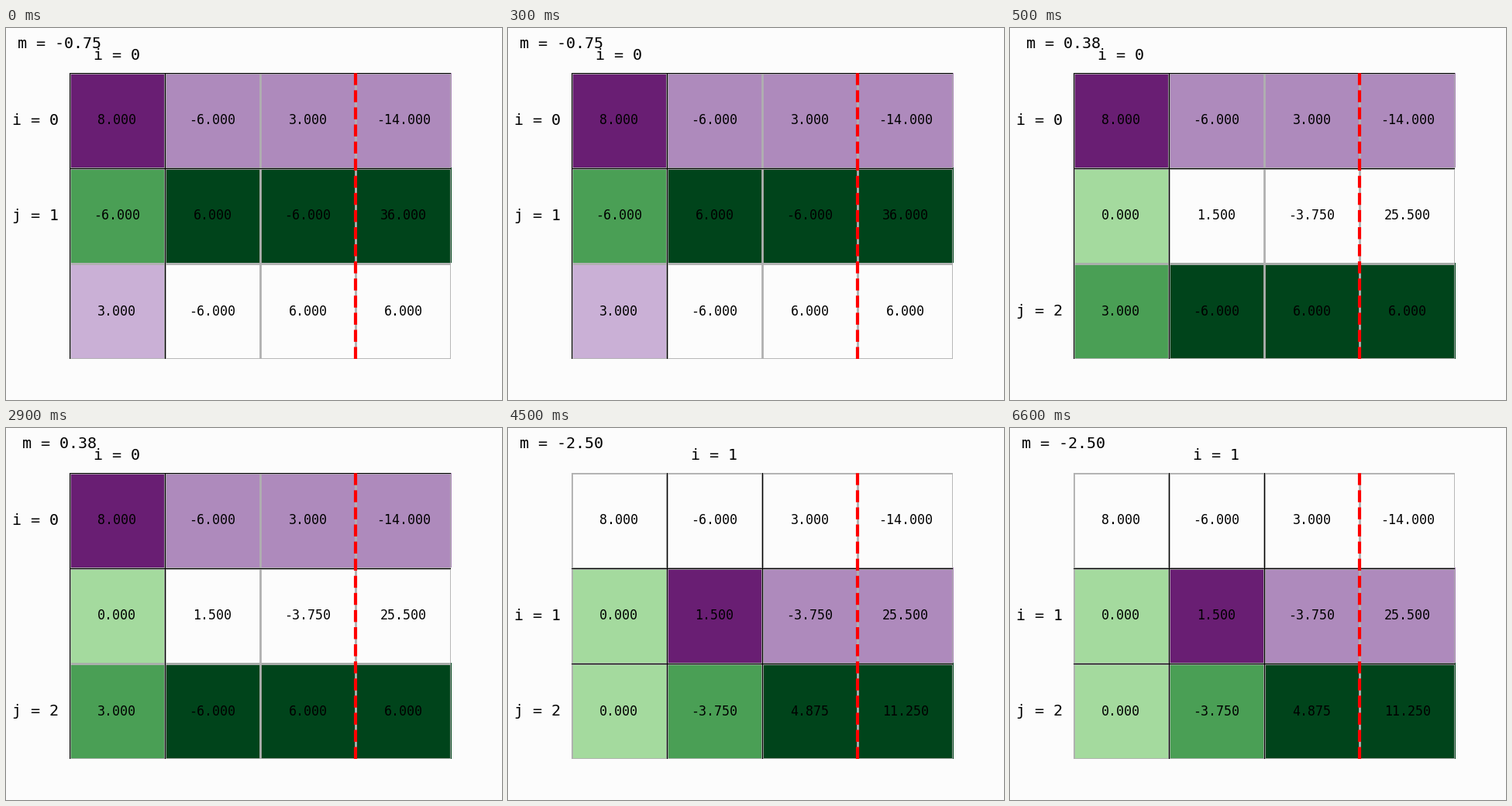
These frames come from a looping animation (640 by 480 pixels, 8000 ms). A matplotlib script:

```python
import numpy as np
import matplotlib.pyplot as plt
from matplotlib.animation import FuncAnimation
from matplotlib.colors import to_rgb

INTERVAL = 500
FRAMES = 16
PAPER = "#fcfcfc"
PIVOT, PIVOT_ROW, PENDING = "#691e73", "#ae8abc", "#cab0d6"
TARGET, TARGET_ROW, DONE = "#4a9f55", "#00441b", "#a4da9e"

START = np.array([[8, -6, 3, -14],
                  [-6, 6, -6, 36],
                  [3, -6, 6, 6]], dtype=float)


def eliminate(matrix):
    """List each step as (pivot i, row j, factor m, matrix before the step)."""
    a = matrix.copy()
    n = len(a)
    steps = []
    for i in range(n - 1):
        for j in range(i + 1, n):
            m = a[j, i] / a[i, i]
            steps.append((i, j, m, a.copy()))
            a[j] -= m * a[i]
    return steps


def cell_colors(i, j):
    rows, cols = START.shape
    img = np.empty((rows, cols, 3))
    img[:] = to_rgb(PAPER)
    for c in range(i):
        img[c + 1:, c] = to_rgb(DONE)
    img[i + 1:j, i] = to_rgb(DONE)
    img[j + 1:, i] = to_rgb(PENDING)
    img[i, i] = to_rgb(PIVOT)
    img[i, i + 1:] = to_rgb(PIVOT_ROW)
    img[j, i] = to_rgb(TARGET)
    img[j, i + 1:] = to_rgb(TARGET_ROW)
    return img


STEPS = eliminate(START)

plt.rcParams["font.family"] = "DejaVu Sans Mono"
fig, ax = plt.subplots(figsize=(6.4, 4.8), dpi=100, facecolor=PAPER)
rows, cols = START.shape
image = ax.imshow(cell_colors(0, 1), interpolation="nearest")
ax.axis("off")

for x in range(cols + 1):
    ax.axvline(x - 0.5, color="#b0b0b0", lw=2, zorder=1.5)
for y in range(rows + 1):
    ax.axhline(y - 0.5, color="#b0b0b0", lw=2, zorder=1.5)

v_edges = [ax.axvline(0, color="black", lw=0.8) for _ in range(2)]
h_edges = [ax.axhline(0, color="black", lw=0.8) for _ in range(2)]
ax.axvline(cols - 1.5, color="red", lw=3, ls="--", zorder=2.5)


def label(x, y, size):
    return ax.text(x, y, "", size=size, ha="center", va="center")


cells = [[label(c, r, 12) for c in range(cols)] for r in range(rows)]
factor = label(-0.6, -0.8, 14.4)
col_label = label(0, -0.68, 14.4)
row_label = label(-0.85, 0, 14.4)
target_label = label(-0.85, 1, 14.4)


def update(frame):
    t = frame * INTERVAL
    i, j, m, a = STEPS[(t >= 500) + (t >= 4500)]
    image.set_data(cell_colors(i, j))
    for k in range(2):
        pos = i - 0.5 + k
        v_edges[k].set_xdata([pos, pos])
        h_edges[k].set_ydata([pos, pos])
    for r in range(rows):
        for c in range(cols):
            cells[r][c].set_text(f"{a[r, c]:.3f}")
    factor.set_text(f"m = {m:.2f}")
    col_label.set_text(f"i = {i}")
    col_label.set_x(i)
    row_label.set_text(f"i = {i}")
    row_label.set_y(i)
    target_label.set_text(f"j = {j}")
    target_label.set_y(j)
    return []


anim = FuncAnimation(fig, update, frames=FRAMES, interval=INTERVAL,
                     init_func=lambda: update(0), repeat=True, repeat_delay=0)
plt.show()
```
